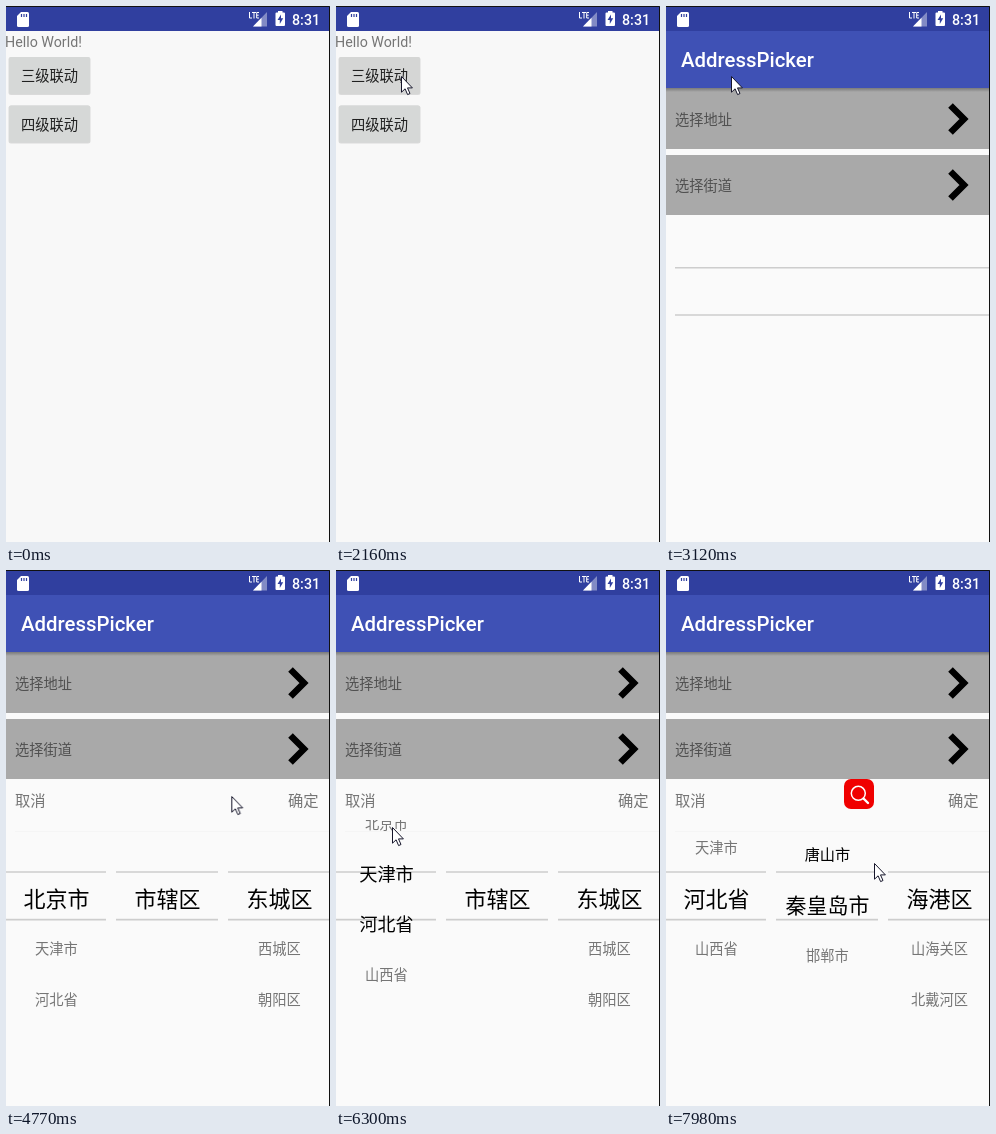
Write an HTML page that moves like this. It is 324 px wide and 536 px high and loops after 8000 ms.

```html
<!DOCTYPE html>
<html lang="zh-CN">
<head>
<meta charset="utf-8">
<title>AddressPicker</title>
<style>
  html, body { margin: 0; width: 100%; height: 100%; overflow: hidden; background: #f8f8f8; }
  svg { display: block; width: 100vw; height: 100vh; }
  text { font: 14.25px Roboto, "Noto Sans CJK SC", "Noto Sans CJK", sans-serif; fill: #757575; }
  .label { font-weight: 500; fill: #202020; text-anchor: middle; }
  .light { font-weight: 500; fill: #fff; }
  .row { fill: #505050; }
  .wheel text { text-anchor: middle; }
  .rule { stroke: #cdcdcd; stroke-width: 1.6; fill: none; }

  #press, #screen, #picker, #search, #cursor { animation: 8s linear infinite; }
  #press { animation-name: press; }
  #screen { animation-name: open; }
  #picker { animation-name: popup; animation-timing-function: step-end; }
  #search { animation-name: search; animation-timing-function: step-end; }
  #cursor { animation-name: cursor; }

  @keyframes press {
    0%, 15.4% { fill: #d6d8d7; }
    18% { fill: #cdcecd; }
    22.5%, 100% { fill: #d5d6d5; }
  }
  @keyframes open {
    0%, 36.4% { opacity: 0; transform: translateY(22px); animation-timing-function: ease-out; }
    39%, 100% { opacity: 1; transform: none; }
  }
  @keyframes popup { 0% { opacity: 0; } 52.5%, 100% { opacity: 1; } }
  @keyframes search { 0% { opacity: 0; } 94.5%, 100% { opacity: 1; } }
  @keyframes cursor {
    0%, 1.5% { transform: translate(325px, 109px); animation-timing-function: ease-out; }
    10.5%, 15.2% { transform: translate(56px, 70px); }
    18.5% { transform: translate(96px, 81px); }
    22.5%, 24.2% { transform: translate(80px, 73px); }
    27%, 43% { transform: translate(65px, 70px); }
    47.6%, 56.1% { transform: translate(106px, 114px); }
    59.62% { transform: translate(225px, 226px); animation-timing-function: ease-out; }
    66%, 66.3% { transform: translate(286px, 226px); animation-timing-function: ease-in-out; }
    72.75% { transform: translate(50px, 332px); }
    76.12% { transform: translate(55px, 278px); animation-timing-function: ease-out; }
    78.75%, 80.4% { transform: translate(56px, 257px); }
    81.4% { transform: translate(57px, 252px); animation-timing-function: ease-in-out; }
    90.4% { transform: translate(170px, 298px); }
    92.25% { transform: translate(179px, 262px); }
    93.75% { transform: translate(188px, 222px); }
    98.25% { transform: translate(206px, 286px); }
    99.75%, 100% { transform: translate(208px, 293px); }
  }
</style>
</head>
<body>
<svg viewBox="0 0 324 536" preserveAspectRatio="none">
  <defs>
    <linearGradient id="fade" x2="0" y2="1">
      <stop stop-opacity=".28"/><stop offset="1" stop-opacity="0"/>
    </linearGradient>
    <clipPath id="window"><path d="M0 250H324V437H0Z"/></clipPath>
    <path id="chevron" d="M284.5 -13.5L298 0L284.5 13.5" fill="none" stroke="#000" stroke-width="6.5"/>
    <rect id="shadow" x="2.5" width="82" height="38" rx="2.5" fill="#000" opacity=".12"/>
  </defs>

  <rect width="324" height="536" fill="#f8f8f8"/>
  <text x="-1" y="41">Hello World!</text>
  <use href="#shadow" y="51"/>
  <rect id="press" x="3" y="51" width="81" height="37" rx="2"/>
  <text class="label" x="43.5" y="75">三级联动</text>
  <use href="#shadow" y="99.5"/>
  <rect x="3" y="99.5" width="81" height="37" rx="2" fill="#d6d8d7"/>
  <text class="label" x="43.5" y="123.5">四级联动</text>

  <g id="screen">
    <rect y="25" width="324" height="540" fill="#fafafa"/>
    <path d="M0 82H324V143H0ZM0 149H324V209H0Z" fill="#a9a9a9"/>
    <rect y="82" width="324" height="4" fill="url(#fade)"/>
    <rect y="25" width="324" height="57" fill="#3f51b5"/>
    <text class="light" x="15" y="61" style="font-size:20.35px">AddressPicker</text>
    <text class="row" x="9" y="118.5">选择地址</text>
    <text class="row" x="9" y="184.5">选择街道</text>
    <use href="#chevron" y="113"/>
    <use href="#chevron" y="179"/>
    <path class="rule" d="M9 261.8H324M9 309H324"/>
  </g>

  <g id="picker">
    <rect y="210" width="324" height="326" fill="#fafafa"/>
    <path d="M9 261.5H324" stroke="#f5f5f5"/>
    <text x="9" y="236" style="font-size:15.3px">取消</text>
    <text x="282" y="236" style="font-size:15.3px">确定</text>
    <path class="rule" d="M0 302H100M110 302H212M222 302H324M0 349.6H100M110 349.6H212M222 349.6H324"/>
    <g id="wheels" clip-path="url(#window)"></g>
  </g>

  <g id="search">
    <rect x="178" y="209" width="30" height="30" rx="7" fill="#f00000"/>
    <path d="M197.5 228.5L202 233" stroke="#fff" stroke-width="2.4" stroke-linecap="round"/>
    <circle cx="192.3" cy="223.3" r="7" fill="none" stroke="#fff" stroke-width="1.5"/>
  </g>

  <rect width="324" height="25" fill="#303f9f"/>
  <g fill="#fff">
    <path d="M15 6H21.5Q23 6 23 7.5V19.5Q23 21 21.5 21H12.5Q11 21 11 19.5V10Z"/>
    <path d="M15.5 8V11M18 8V11M20.5 8V11" stroke="#303f9f" stroke-width="1.2"/>
    <path d="M261 6V20.5H247Z" opacity=".4"/>
    <path d="M255.5 11.7V20.5H247Z"/>
    <path d="M242 5H253V13H242Z" fill="#303f9f"/>
    <path d="M243.5 6V12H246M246 6.5H250M248 6.5V12.5M253 6.5H250.7V12H253M250.7 9.2H252.7" fill="none" stroke="#fff"/>
    <path d="M272 5H276.5V6.5H278Q279 6.5 279 7.5V19Q279 20 278 20H270.5Q269.5 20 269.5 19V7.5Q269.5 6.5 270.5 6.5H272Z"/>
    <path d="M275 8.5L271.5 14H273.8V18L277.2 12.3H275Z" fill="#303f9f"/>
  </g>
  <text class="light" x="286" y="18.5">8:31</text>
  <path d="M0 .5H323.5V536" fill="none" stroke="#111"/>

  <path id="cursor" d="M.5 .5V16.2L4.1 12.8L6.6 18.6L9 17.5L6.5 11.9H11.4Z" fill="#fff" stroke="#15152a"/>
</svg>

<script>
const LOOP = 8000, CENTER = 328.5, PITCH = 50.5, LARGE = 22, SMALL = 14.25;

// lists: [start ms, items]; scroll: [ms, position in items]
const columns = [
  { x: 50.5,
    lists: [[0, '北京市 天津市 河北省 山西省']],
    scroll: [[5820, 0], [6090, 1.07], [6180, 1.32], [6300, 1.485], [6440, 1.485], [6510, 1.58], [6720, 2]] },
  { x: 161.5,
    lists: [[0, '市辖区'], [6720, '石家庄市 唐山市 秦皇岛市 邯郸市']],
    scroll: [[7235, 0], [7380, 0.71], [7500, 1.5], [7680, 2], [7860, 2], [7980, 1.87]] },
  { x: 273.5,
    lists: [[0, '东城区 西城区 朝阳区'], [6720, '长安区 桥西区 新华区'], [7680, '海港区 山海关区 北戴河区']],
    scroll: [[0, 0]] }
];

function valueAt(stops, t) {
  const next = stops.findIndex(([time]) => time > t);
  if (next < 0) return stops.at(-1)[1];
  if (next === 0) return stops[0][1];
  const [t0, v0] = stops[next - 1], [t1, v1] = stops[next];
  return v0 + (v1 - v0) * (t - t0) / (t1 - t0);
}

const svgNode = (name, parent) =>
  parent.appendChild(document.createElementNS('http://www.w3.org/2000/svg', name));

for (const column of columns) {
  const group = svgNode('g', document.getElementById('wheels'));
  group.setAttribute('class', 'wheel');
  column.texts = Array.from({ length: 4 }, () => svgNode('text', group));
}

function drawColumn({ x, lists, scroll, texts }, t) {
  const items = lists.findLast(([time]) => time <= t)[1].split(' ');
  const position = valueAt(scroll, t);
  texts.forEach((text, i) => {
    const offset = (i - position) * PITCH;
    const near = Math.max(0, 1 - Math.abs(offset) / PITCH);
    const size = SMALL + (LARGE - SMALL) * near;
    text.textContent = items[i] ?? '';
    text.setAttribute('x', x);
    text.setAttribute('y', CENTER + offset + size * 0.38);
    text.style.fontSize = size + 'px';
    text.style.fill = near > 0.01 ? '#000' : '#757575';
  });
}

let start;
function frame(now) {
  start ??= now;
  const t = (now - start) % LOOP;
  columns.forEach(column => drawColumn(column, t));
  requestAnimationFrame(frame);
}
requestAnimationFrame(frame);
</script>
</body>
</html>
```
